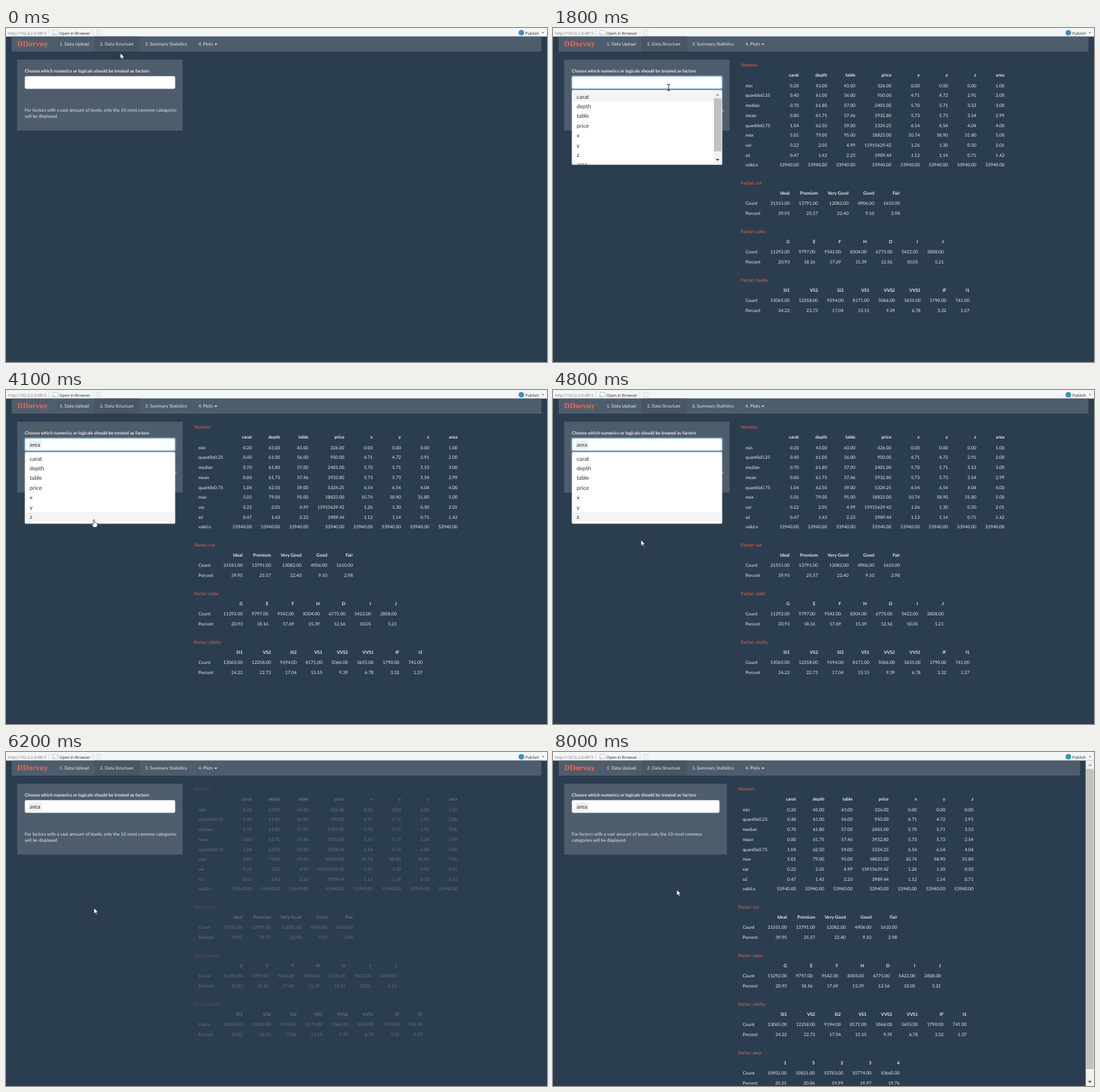
Write an HTML page that moves like this. It is 800 by 495 pixels and loops after 8100 ms.

```html
<!DOCTYPE html>
<html lang="en">
<head>
<meta charset="utf-8">
<title>Data structure tab</title>
<style>
html, body { margin: 0; width: 100%; height: 100%; overflow: hidden; background: #2b3e50; }
svg { display: block; width: 800px; height: 495px; text-rendering: geometricPrecision; }
text { font: 6.63px Lato, sans-serif; fill: #ebebeb; white-space: pre; }
.b { font-weight: bold; }
.h { fill: tomato; }
.brand { font: bold 11.5px "Liberation Serif", serif; fill: tomato; }
.bar { font: 5.85px "Open Sans", sans-serif; fill: #222; }
.url { fill: #777; }
.opt { font-size: 8.4px; fill: #333; }
</style>
</head>
<body>
<svg id="stage" viewBox="0 0 800 495"></svg>
<script>
const LOOP = 8100, STEP = 100;
const SHOWN = 800, OPENED = 1500, PICKED = 3900, CLOSED = 4900, UPDATED = 7500;
const ROW = 14.37;
const stage = document.getElementById('stage');

const clamp = (v, a, b) => Math.min(b, Math.max(a, v));
const ramp = (t, a, b) => clamp((t - a) / (b - a), 0, 1);
const rect = (x, y, w, h, fill, more = '') =>
  `<rect x="${x}" y="${y}" width="${w}" height="${h}" fill="${fill}" ${more}/>`;
const path = (d, fill, more = '') => `<path d="${d}" fill="${fill}" ${more}/>`;
const text = (x, y, s, cls = '', anchor = 'start') =>
  `<text x="${x}" y="${y}" class="${cls}" text-anchor="${anchor}">${s}</text>`;
const arrow = (x, y, dir, fill, r = 2.8) =>
  path(`M${x - r} ${y - dir * r / 2}h${2 * r}l${-r} ${dir * r}z`, fill);

// First word of each row is its label; "~" stands for a space inside a word.
const numeric = ['Numeric', 363.5,
  '- carat depth table price x y z area',
  'min 0.20 43.00 43.00 326.00 0.00 0.00 0.00 1.00',
  'quantile0.25 0.40 61.00 56.00 950.00 4.71 4.72 2.91 2.00',
  'median 0.70 61.80 57.00 2401.00 5.70 5.71 3.53 3.00',
  'mean 0.80 61.75 57.46 3932.80 5.73 5.73 3.54 2.99',
  'quantile0.75 1.04 62.50 59.00 5324.25 6.54 6.54 4.04 4.00',
  'max 5.01 79.00 95.00 18823.00 10.74 58.90 31.80 5.00',
  'var 0.22 2.05 4.99 15915629.42 1.26 1.30 0.50 2.01',
  'sd 0.47 1.43 2.23 3989.44 1.12 1.14 0.71 1.42',
  'valid.n' + ' 53940.00'.repeat(8)];
const factors = [
  ['Factor: cut', 350, '- Ideal Premium Very~Good Good Fair',
    'Count 21551.00 13791.00 12082.00 4906.00 1610.00',
    'Percent 39.95 25.57 22.40 9.10 2.98'],
  ['Factor: color', 350, '- G E F H D I J',
    'Count 11292.00 9797.00 9542.00 8304.00 6775.00 5422.00 2808.00',
    'Percent 20.93 18.16 17.69 15.39 12.56 10.05 5.21'],
  ['Factor: clarity', 350, '- SI1 VS2 SI2 VS1 VVS2 VVS1 IF I1',
    'Count 13065.00 12258.00 9194.00 8171.00 5066.00 3655.00 1790.00 741.00',
    'Percent 24.22 22.73 17.04 15.15 9.39 6.78 3.32 1.37'],
  ['Factor: area', 349.5, '- 1 5 2 3 4',
    'Count 10902.00 10821.00 10783.00 10774.00 10660.00',
    'Percent 20.21 20.06 19.99 19.97 19.76']];

function table([title, first, ...lines], y, skipLast) {
  const rows = lines.map(l => l.split(' '));
  const count = rows[0].length - (skipLast ? 1 : 0);
  let out = text(278, y + 2.3, title, 'h'), right = first;
  for (let c = 0; c < count; c++) {
    if (c > 1) {
      const digits = Math.max(...rows.slice(1).map(r => r[c].length));
      right += 13.3 + Math.max(3.845 * digits - 2.25, 3.55 * rows[0][c].length);
    }
    rows.forEach((r, i) => {
      const by = y + 17.3 + (i && 0.7) + i * 14.7;
      if (c) out += text(right, by, r[c].replace('~', ' '), i ? '' : 'b', 'end');
      else if (i) out += text(284.5, by, r[0]);
    });
  }
  return out;
}

function results(t) {
  if (t < SHOWN) return '';
  const done = t >= UPDATED;
  const alpha = done ? 1 : 1 - 0.7 * ramp(t, CLOSED, CLOSED + 250);
  const list = done ? factors : factors.slice(0, 3);
  return `<g opacity="${alpha}" transform="translate(${done ? -4.1 : 0})">` +
    table(numeric, 55, done) +
    list.map((f, i) => table(f, 229.5 + 72 * i)).join('') + '</g>';
}

function toolbar() {
  return rect(0, 0, 800, 12.7, '#f4f5f6') +
    text(3, 9.6, 'http://192.0.2.0:4815', 'bar url') +
    rect(63, 2, 0.6, 9, '#ccc') + rect(128.5, 2, 0.6, 9, '#ccc') +
    rect(69.5, 3.5, 7, 6.5, '#fff', 'stroke="#b4bec8" stroke-width=".7"') +
    path('M68 8.5h3v-1.5l2.5 2.2-2.5 2.2v-1.3h-3z', '#b9cfe0') +
    text(79, 9.8, 'Open in Browser', 'bar') +
    rect(134, 3.5, 6.5, 7, '#fafafa', 'stroke="#d2d5d8" stroke-width=".7"') +
    path('M139 5.7a2 2 0 1 0 .2 2.3', 'none', 'stroke="#c5cbd1" stroke-width=".7"') +
    '<circle cx="762" cy="7" r="4" fill="#3a8fc4"/>' +
    text(768, 9.8, 'Publish', 'bar') + arrow(794, 7, 1, '#444', 1.7);
}

function navbar(right) {
  return rect(8.3, 12.7, right - 8.3, 22.3, '#4e5d6c') +
    rect(131, 12.7, 67, 22.3, '#485563') +
    text(16.6, 27.4, 'DDorvuy', 'brand') +
    text(79.3, 26.2, '1. Data Upload') + text(139, 26.2, '2. Data Structure') +
    text(205.7, 26.2, '3. Summary Statistics') + text(284.5, 26.2, '4. Plots') +
    arrow(310.3, 24.3, 1, '#ebebeb', 2.3);
}

function panel(t, open) {
  const done = t >= UPDATED, picked = t >= PICKED;
  const w = done ? 218 : 222;
  const note = done
    ? ['For factors with a vast amount of levels, only the 10 most common',
       'categories will be displayed.']
    : ['For factors with a vast amount of levels, only the 10 most common categories',
       'will be displayed.'];
  let out = rect(16.6, 47, w + 22.6, 105, '#4e5d6c') +
    text(27.8, 66.4, 'Choose which numerics or logicals should be treated as factors', 'b') +
    rect(28, 104.8, w, 0.6, '#596775') +
    text(27.8, 124, note[0]) + text(27.8, 133.3, note[1]);
  if (open) out += rect(27.3, 70.8, w + 1.4, 19.9, 'none',
    'rx="2.5" stroke="#66afe9" stroke-opacity=".45" stroke-width="2"');
  out += rect(28, 71.5, w, 18.5, '#fff',
    `rx="2" stroke="${open ? '#66afe9' : '#ccc'}" stroke-width=".7"`);
  if (picked) out += rect(33.2, 75, 19.6, 12, '#efefef', 'rx="1"') +
    text(35, 83.8, 'area', 'opt');
  if (open && (t - 1000) % 1060 < 530) out += rect(picked ? 55 : 35.6, 76, 0.7, 9.5, '#333');
  return out;
}

function dropdown(t, y) {
  const picked = t >= PICKED;
  const names = numeric[2].split(' ').slice(1, picked ? 8 : 9);
  const scroll = picked ? 0 : 10 * ramp(t, 2400, 2700);
  const hot = picked ? 6 : clamp(Math.floor((y - 94.7 + scroll) / ROW), 0, 7);
  const h = picked ? 106 : 110.5, w = picked ? 222 : 209.5;
  let out = rect(28, 92, 222, h, '#fff', 'rx="1.5" stroke="#c8ccd0" stroke-width=".7"') +
    `<clipPath id="list"><rect x="28" y="92" width="222" height="${h}"/></clipPath>` +
    '<g clip-path="url(#list)">';
  names.forEach((name, i) => {
    const top = 94.7 - scroll + i * ROW;
    if (i === hot) out += rect(28, top, w, ROW, '#f3f3f3');
    out += text(35, top + 10, name, 'opt');
  });
  out += '</g>';
  if (!picked) out += rect(237.5, 92.2, 12.2, 110, '#f1f1f1') +
    rect(238, 104.3 + scroll * 0.7, 11.2, 78.5, '#c1c1c1') +
    arrow(243.3, 99, -1, scroll > 0 ? '#444' : '#a3a3a3') +
    arrow(243.3, 195.5, 1, scroll < 10 ? '#444' : '#a3a3a3');
  return out;
}

const pageScroll = () => rect(787.7, 12.7, 12.3, 482.3, '#f1f1f1') +
  rect(788.3, 25, 11.1, 445, '#c1c1c1') +
  arrow(794, 19, -1, '#a3a3a3') + arrow(794, 489, 1, '#444');

// time, x, y of the pointer's hot spot
const trail = [[0, 169, 37], [800, 169, 40], [1400, 171, 84], [1800, 171, 88], [2400, 140, 150],
  [3200, 128, 184], [3600, 130, 192], [4100, 130, 192], [4800, 130, 222], [5200, 130, 231],
  [6400, 130, 231], [7200, 139.5, 220.5], [8000, 183, 204]];

function pointer(t) {
  const i = clamp(trail.findIndex(k => k[0] > t), 1, trail.length) || 1;
  const b = t >= 8000 ? trail[trail.length - 1] : trail[i], a = trail[i - 1];
  const p = t >= 8000 ? 1 : ramp(t, a[0], b[0]);
  return [a[1] + (b[1] - a[1]) * p, a[2] + (b[2] - a[2]) * p];
}

function cursor(x, y, open, bottom) {
  const line = 'stroke="#222" stroke-width=".7" stroke-linejoin="round"';
  let shape;
  if (y > 71.5 && y < 91)
    shape = path('M-2-4.5h1.4l.6.6.6-.6h1.4M0-4v8M-2 4.5h1.4l.6-.6.6.6h1.4', 'none',
      'stroke="#111" stroke-width=".9"');
  else if (open && y > 91 && y < bottom)
    shape = path('M-.9 .8q.9-1.2 1.8 0v3.6l1.5.2 1.5.4 1.2.7v2.9l-1 3h-4.7l-2.7-4.3' +
      'q.2-1.3 1.4-.7l1 .9z', '#fff', line);
  else shape = path('M0 0v8.7l2-1.8 1.4 3.1 1.5-.7-1.4-3h2.7z', '#fff', line);
  return `<g transform="translate(${x} ${y})">${shape}</g>`;
}

function draw(t) {
  const open = t >= OPENED && t < CLOSED, done = t >= UPDATED;
  const [x, y] = pointer(t);
  stage.innerHTML = rect(0, 0, 800, 495, '#2b3e50') + toolbar() +
    navbar(done ? 779.4 : 791.7) + results(t) + panel(t, open) +
    (open ? dropdown(t, y) : '') + (done ? pageScroll() : '') +
    cursor(x, y, open, t >= PICKED ? 198 : 203);
}

const start = performance.now();
let last = -1;
function tick() {
  const t = Math.floor((performance.now() - start) % LOOP / STEP) * STEP;
  if (t !== last) draw(last = t);
  requestAnimationFrame(tick);
}
tick();
</script>
</body>
</html>
```
